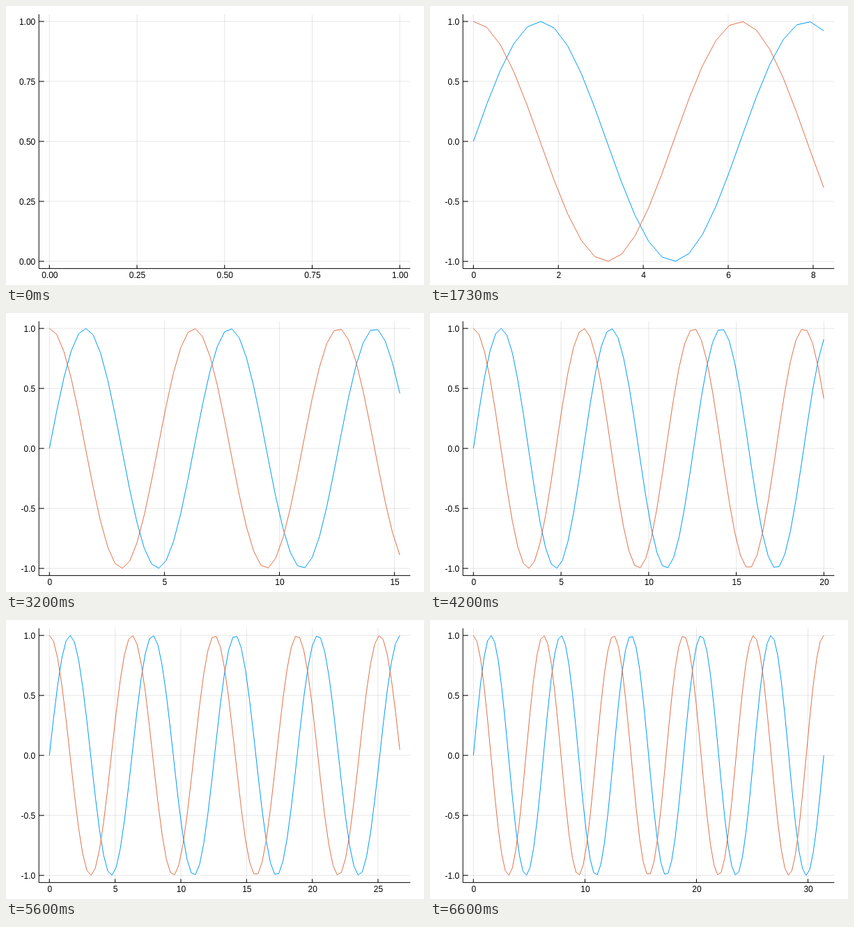
An HTML page that plays this animation: 600 px wide and 400 px high, repeating every 6.67 s.

```html
<!DOCTYPE html>
<html lang="en">
<head>
<meta charset="utf-8">
<title>Sine and cosine</title>
<style>
  html, body { margin: 0; width: 100%; height: 100%; overflow: hidden; background: #fff; }
  svg { display: block; }
  path, polyline { fill: none; stroke-width: 1; }
  text { font: 12px "Liberation Sans", Arial, sans-serif; fill: #000; }
</style>
</head>
<body>
<svg id="plot" width="600" height="400" viewBox="0 0 600 400"></svg>
<script>
const plot = document.getElementById('plot');
const LOOP = 6670, LAST = 99, STEP = 10 * Math.PI / LAST;
const LEFT = 47.24, RIGHT = 580.31, TOP = 11.81, BOTTOM = 376.38;
const NICE = [[5, 0.9], [3, 0.2], [2.5, 0.5], [2, 0.7], [1, 1]];

// Limits padded by 3%, and the tick step with the best score for count, coverage and niceness
function makeAxis(min, max, from, to) {
  const pad = (max - min) * 0.03;
  const lo = min - pad, hi = max + pad, span = hi - lo;
  let best = -Infinity, step = 1;
  for (let z = 2; z >= -3; z--) {
    for (const [q, nice] of NICE) {
      const s = q * 10 ** z;
      const n = Math.floor(hi / s) - Math.ceil(lo / s) + 1;
      if (n < 4 || n > 8) continue;
      const score = 0.25 * (1 - Math.abs(n - 5) / 5) + 0.5 * span / ((n - 1) * s) + 0.25 * nice;
      if (score > best + 1e-9) { best = score; step = s; }
    }
  }
  const decimals = (String(+step.toPrecision(6)).split('.')[1] || '').length;
  const pos = v => from + (v - lo) / span * (to - from);
  const ticks = [];
  for (let i = Math.ceil(lo / step); i * step <= hi; i++) {
    ticks.push({ at: pos(i * step), label: (i * step).toFixed(decimals) });
  }
  return { pos, ticks };
}

const path = (d, style) => `<path d="${d}" ${style}/>`;
const label = (x, y, anchor, s) => `<text x="${x}" y="${y}" text-anchor="${anchor}">${s}</text>`;

function draw(count) {
  const xs = Array.from({ length: count + 1 }, (_, i) => i * STEP);
  const low = Math.min(...xs.map(Math.sin), ...xs.map(Math.cos));
  const x = makeAxis(0, xs[count] || 1, LEFT, RIGHT);
  const y = makeAxis(low, 1, BOTTOM, TOP);
  let grid = '', axes = `M${LEFT} ${TOP}V${BOTTOM}H${RIGHT}`, labels = '';

  for (const t of x.ticks) {
    grid += `M${t.at} ${TOP}V${BOTTOM}`;
    axes += `M${t.at} ${BOTTOM}v-5.1`;
    labels += label(t.at + 0.5, 390, 'middle', t.label);
  }
  for (const t of y.ticks) {
    grid += `M${LEFT} ${t.at}H${RIGHT}`;
    axes += `M${LEFT} ${t.at}h7.5`;
    labels += label(42.3, t.at + 4.6, 'end', t.label);
  }
  const curve = (f, color) =>
    `<polyline stroke="${color}" points="${xs.map(v => x.pos(v) + ',' + y.pos(f(v))).join(' ')}"/>`;

  plot.innerHTML = path(grid, 'stroke="#000" stroke-opacity=".1"') + path(axes, 'stroke="#000"') + labels +
    (count ? curve(Math.sin, '#009afa') + curve(Math.cos, '#e36f47') : '');
}

let shown = -1;
function tick() {
  // 15 steps a second, each starting on a hundredth of a second
  const hundredths = Math.floor(performance.now() % LOOP / 10);
  const count = Math.min(LAST, Math.floor((hundredths + 0.4) * 0.15));
  if (count !== shown) draw(shown = count);
  requestAnimationFrame(tick);
}
tick();
</script>
</body>
</html>
```
